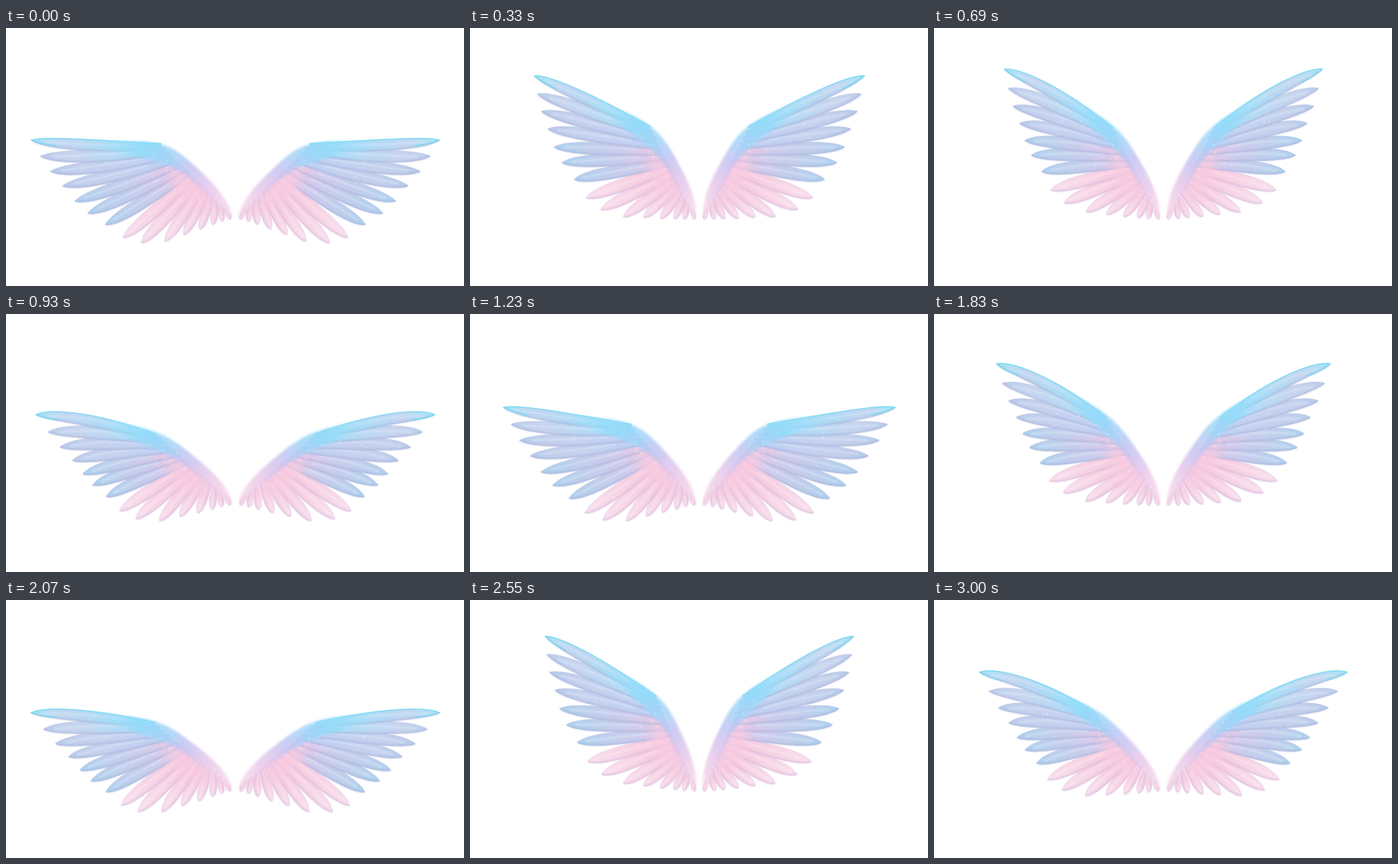
Recreate the animation shown at these times as an HTML page. Size 600x338 px, loop 3030 ms.

```html
<!DOCTYPE html>
<html lang="en">
<head>
<meta charset="utf-8">
<title>Wings</title>
<style>
html, body { margin: 0; width: 100%; height: 100%; overflow: hidden; background: #fff; }
svg { display: block; width: 100vw; height: 100vh; }
</style>
</head>
<body>
<svg viewBox="0 0 600 338">
  <defs id="defs">
    <filter id="soft" x="-20%" y="-20%" width="140%" height="140%"><feGaussianBlur stdDeviation="1.8"/></filter>
    <filter id="haze" x="-40%" y="-40%" width="180%" height="180%"><feGaussianBlur stdDeviation="6"/></filter>
    <filter id="fine" x="-20%" y="-50%" width="140%" height="200%"><feGaussianBlur stdDeviation=".9"/></filter>
    <linearGradient id="arm" gradientUnits="userSpaceOnUse" x1="125" y1="130" x2="295" y2="245">
      <stop offset="0" stop-color="#a5def8" stop-opacity="0"/>
      <stop offset=".3" stop-color="#94ddfa"/>
      <stop offset=".48" stop-color="#a4d4f8"/>
      <stop offset=".62" stop-color="#c5c4f2"/>
      <stop offset=".8" stop-color="#e8c9ea"/>
      <stop offset="1" stop-color="#f8dcea"/>
    </linearGradient>
  </defs>
  <g id="wing"></g>
  <use href="#wing" transform="translate(601 0) scale(-1 1)"/>
</svg>
<script>
const LOOP = 3030, STEP = 30, PIVOT = [290, 245], REST = 20.9;
const KEY_TIMES = [0, 525, 1065, 1615, 2160, 2705, 3250];
const KEY_ANGLES = [20.9, 50.6, 19.8, 52.2, 18.5, 52.2, 18.5];
const TIPS = [[33, 147], [45, 168], [58, 188], [74, 207], [90, 227], [107, 243], [130, 258], [153, 275],
  [177, 282], [208, 280], [233, 271], [254, 264], [271, 258], [283, 254], [294, 251]];

const wing = document.getElementById('wing');
const defs = document.getElementById('defs');

let seed = 7;
const random = () => (seed = seed * 16807 % 2147483647) / 2147483647;

function make(parent, tag, attrs) {
  const node = document.createElementNS('http://www.w3.org/2000/svg', tag);
  for (const key in attrs) node.setAttribute(key, attrs[key]);
  return parent.appendChild(node);
}

function sparkle(parent, x, y) {
  make(parent, 'circle', { cx: x, cy: y, r: 0.3 + random() * 0.5, fill: '#fff', opacity: 0.5 + random() * 0.4 });
}

function palette(i) {
  if (i === 0) return ['#a2e6f6', '#c3d5f0', '#a8ddf6', '#8fdcfa'];
  if (i === 1) return ['#bdcdea', '#c8d4ee', '#b4dbf5', '#a0d9f7'];
  if (i < 4) return ['#b8cbea', '#c5d0ec', '#c4d1f0', '#bcd3f5'];
  if (i < 7) return ['#aed1ee', '#bccfec', '#cfcbec', '#ecc9e4'];
  return ['#f8e0ef', '#f7d9e8', '#f7cee1', '#f3c8e2'];
}

function rotate([x, y], degrees, stretch = 1) {
  const a = degrees * Math.PI / 180, dx = (x - PIVOT[0]) * stretch, dy = (y - PIVOT[1]) * stretch;
  return [PIVOT[0] + dx * Math.cos(a) - dy * Math.sin(a), PIVOT[1] + dx * Math.sin(a) + dy * Math.cos(a)];
}

const feathers = TIPS.map((tip, i) => {
  const s = i / 14;
  const base = [203 + 84 * s, 155 + 81 * s];
  const length = Math.hypot(base[0] - tip[0], base[1] - tip[1]);
  const width = i === 0 ? 7.5 : i < 9 ? 8.5 : 8.5 - 0.9 * (i - 8);
  const gradient = make(defs, 'linearGradient', {
    id: 'hue' + i, gradientUnits: 'userSpaceOnUse', x1: 0, x2: length, y1: 0, y2: 0
  });
  palette(i).forEach((color, k) =>
    make(gradient, 'stop', { offset: [0, 0.25, 0.65, 1][k], 'stop-color': color }));
  return { i, tip, base, length, width };
});

// Upper feathers lie over the lower ones.
for (const f of [...feathers].reverse()) {
  const blue = f.i < 7;
  f.group = make(wing, 'g', {});
  f.body = make(f.group, 'path', {
    fill: `url(#hue${f.i})`, stroke: blue ? '#b4bee2' : '#dfc6e2', 'stroke-width': 0.5
  });
  f.shade = make(f.group, 'path', {
    fill: 'none', stroke: blue ? '#98a2d0' : '#c6a4d2', 'stroke-width': 1.8, opacity: 0.48, filter: 'url(#fine)'
  });
  f.light = make(f.group, 'path', {
    fill: 'none', stroke: blue ? '#dcebfa' : '#fdeaf3', 'stroke-width': f.width * 0.35,
    opacity: 0.5, 'stroke-linecap': 'round', filter: 'url(#fine)'
  });
  if (f.i === 0) f.rim = make(f.group, 'path', { fill: 'none', stroke: '#58dcf6', 'stroke-width': 1.2, opacity: 0.7 });
  if (f.i < 8) for (let k = 0; k < 7; k++)
    sparkle(f.group, f.length * (0.35 + random() * 0.6), (random() - 0.5) * f.width);
}

const arm = make(wing, 'g', {});
make(arm, 'ellipse', {
  cx: 241, cy: 212, rx: 32, ry: 14, transform: 'rotate(45 241 212)', fill: '#f9cce1', opacity: 0.75, filter: 'url(#haze)'
});
const mantle = make(arm, 'path', { fill: 'url(#arm)', opacity: 0.85, filter: 'url(#soft)' });
for (let k = 0; k < 22; k++) {
  const s = random();
  sparkle(arm, 185 + 80 * s + random() * 8, 155 + 70 * s + random() * 14);
}

function pose(time) {
  let k = 0;
  while (time >= KEY_TIMES[k + 1]) k++;
  const u = (time - KEY_TIMES[k]) / (KEY_TIMES[k + 1] - KEY_TIMES[k]);
  const ease = (1 - Math.cos(Math.PI * u)) / 2;
  return {
    turn: KEY_ANGLES[k] + (KEY_ANGLES[k + 1] - KEY_ANGLES[k]) * ease - REST,
    fall: k % 2 ? 2 * u * Math.sin(Math.PI * u) : 0
  };
}

function draw(time) {
  const { turn, fall } = pose(time);
  const lift = turn / 29;
  const armTurn = turn * 0.87 - 6.5 * fall;
  arm.setAttribute('transform', `rotate(${armTurn} ${PIVOT})`);

  for (const f of feathers) {
    const lag = Math.sin(Math.PI * f.i / 15) ** 2 * (1.2 * lift + 3.2 * fall);
    const stretch = 1 - 0.04 * fall * Math.sin(2 * Math.PI * f.i / 13);
    const tip = rotate(f.tip, f.i === 14 ? 0 : turn + lag, stretch);
    const base = rotate(f.base, armTurn);
    const dx = base[0] - tip[0], dy = base[1] - tip[1];
    const span = Math.hypot(dx, dy);
    const angle = Math.atan2(dy, dx) * 180 / Math.PI;
    f.group.setAttribute('transform', `translate(${tip}) rotate(${angle}) scale(${span / f.length} 1)`);

    const L = f.length, w = f.width;
    const bow = (4 - 9.5 * fall - 7.5 * lift) * (1 - f.i / 15) ** 2;
    const edge = side => [
      [L * 0.1, side * w * 1.15 + bow * 0.5],
      [L * 0.47, side * w * 1.2 + bow * 1.3],
      [L, side * w * 0.5]
    ];
    const top = edge(-1), low = edge(1);
    f.body.setAttribute('d', `M0 0C${top.join(' ')}L${low[2]}C${low[1]} ${low[0]} 0 0Z`);
    f.shade.setAttribute('d', `M1 0C${low.map(([x, y]) => [x, y - 0.8]).join(' ')}`);
    f.light.setAttribute('d', `M${L * 0.1} ${bow * 0.2}Q${L * 0.4} ${bow * 1.3 - w * 0.2} ${L * 0.75} ${bow * 0.5 - w * 0.2}`);

    if (f.i === 0) {
      f.rim.setAttribute('d', `M${L * 0.2} ${w * 0.55 + bow * 0.4}Q${L * 0.06} ${w * 0.5} 0 0C${top.join(' ')}`);
      // The mantle grows out of the leading feather and bends over the arm.
      const onFeather = side => {
        const offset = side * w * 0.85 + bow * 0.7;
        return rotate([tip[0] + dx * 0.55 - dy / span * offset, tip[1] + dy * 0.55 + dx / span * offset], -armTurn);
      };
      mantle.setAttribute('d', `M${onFeather(-1)}C203 146 215 150 250 183Q292 221 297 248L289 242` +
        `Q265 219 240 196Q213 172 ${onFeather(1)}Z`);
    }
  }
}

const start = performance.now();
function tick() {
  const time = (performance.now() - start) % LOOP;
  draw(Math.floor(time / STEP) * STEP);
  requestAnimationFrame(tick);
}
tick();
</script>
</body>
</html>
```
